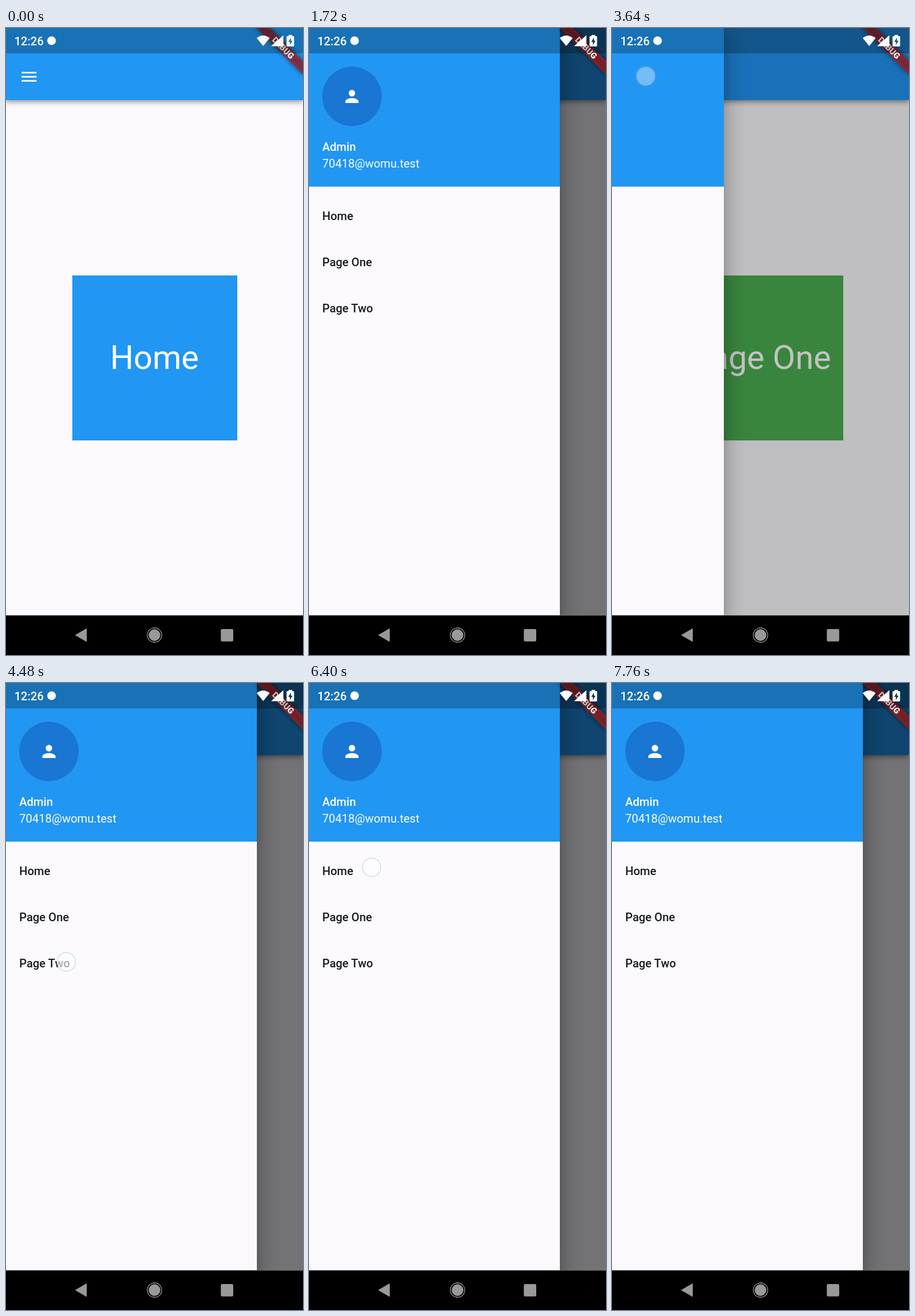
An HTML page that plays this animation: 515 px wide and 1087 px high, repeating every 8000 ms.

```html
<!DOCTYPE html>
<html lang="en">
<head>
<meta charset="utf-8">
<title>Navigation drawer</title>
<style>
  html, body { margin: 0; width: 100%; height: 100%; overflow: hidden; background: #000; }
  body, #app { font: 20px Roboto, sans-serif; }
  #app { position: relative; width: 515px; height: 1087px; overflow: hidden; background: #fbf9fd; }
  #app div, svg { position: absolute; }
  svg { left: 0; top: 0; }
  .blue { background: #2196f3; }
  .bar { width: 515px; height: 124.5px;
    box-shadow: 0 3px 6px -1px #0003, 0 6px 7px #00000024, 0 1px 12px #0000001f; }
  #card { left: 114.5px; top: 428.5px; width: 286px; height: 286px;
    font-size: 57.2px; line-height: 286px; text-align: center; white-space: nowrap; color: #fff; }
  #scrim { width: 515px; height: 1018px; background: #000; }
  #drawer { width: 435px; height: 1018px; background: #fbf9fd;
    box-shadow: 0 8px 15px -4px #0003, 0 18px 32px 3px #00000024, 0 8px 36px 6px #0000001f; }
  .header { width: 435px; height: 274.5px; }
  #touch { width: 31px; height: 31px; margin: -17px; border: 1.5px solid #8eaed899;
    border-radius: 50%; background: #ffffffa0; box-shadow: 0 0 4px #ffffff50; }
</style>
</head>
<body>
<div id="app">
  <div id="card"></div>
  <div class="bar blue"></div>
  <svg width="515" height="125" fill="#fff">
    <path d="M27.1 75.9h25.8v2.9H27.1zM27.1 83h25.8v2.9H27.1zM27.1 90.2h25.8v2.9H27.1z"/>
  </svg>
  <div id="scrim"></div>

  <div id="drawer">
    <div class="header blue"></div>
    <svg width="435" height="1018" fill="#fff">
      <circle cx="74.5" cy="118.5" r="51.5" fill="#1976d2"/>
      <path transform="translate(57.3 101.5) scale(1.4306)"
        d="M12 12a4 4 0 1 0 0-8 4 4 0 0 0 0 8zm0 2c-2.67 0-8 1.34-8 4v2h16v-2c0-2.66-5.33-4-8-4z"/>
      <text x="23" y="213" font-weight="500">Admin</text>
      <text x="23" y="242">70418@womu.test</text>
      <g fill="#1a1b20" font-weight="500">
        <text x="23" y="333">Home</text>
        <text x="23" y="413">Page One</text>
        <text x="23" y="493">Page Two</text>
      </g>
    </svg>
  </div>

  <svg width="515" height="1087" fill="#fff">
    <defs>
      <filter id="soft" x="-20%" y="-100%" width="140%" height="300%">
        <feGaussianBlur stdDeviation="3"/>
      </filter>
    </defs>
    <!-- corner banner -->
    <g transform="translate(515) rotate(45) scale(1.4306)">
      <rect x="-40" y="28" width="80" height="12" fill="#0000007f" filter="url(#soft)"/>
      <rect x="-40" y="28" width="80" height="12" fill="#b71c1ca0"/>
      <text y="37.6" font-size="10.2" font-weight="900" text-anchor="middle">DEBUG</text>
    </g>
    <!-- status bar -->
    <rect width="515" height="44" fill="#00000040"/>
    <text x="14.5" y="30" font-weight="500">12:26</text>
    <circle cx="79" cy="22" r="7.5"/>
    <path d="M434.8 17.5Q446 8.5 457.2 17.5L446 31.2zM481 12.5V31.5H459.5z"/>
    <path fill-rule="evenodd" d="M490 12h6v2h2q1.5 0 1.5 1.5v15q0 1.5-1.5 1.5h-10q-1.500 0-1.500-1.500v-15q0-1.500 1.500-1.500h2z
      M494 16.500l-4.500 7.500h2.800v5.500l4.500-7.500h-2.800z"/>
    <!-- system navigation -->
    <rect y="1018.300" width="515" height="69"/>
    <rect y="1018.300" width="515" height="69" fill="#000"/>
    <g fill="#999" stroke="#999" stroke-linejoin="round">
      <path d="M120.500 1052.500L139.500 1041.500V1063.500z"/>
      <circle cx="257.500" cy="1052.500" r="9.700"/>
      <circle cx="257.500" cy="1052.500" r="12.500" fill="none" stroke-width="1.300"/>
      <rect x="373" y="1042.500" width="20.500" height="20.500" rx="1.500"/>
    </g>
  </svg>
  <div id="touch"></div>
</div>

<script>
const LOOP = 8000, STEP = 40, WIDTH = 435;
const $ = id => document.getElementById(id);
const card = $('card'), scrim = $('scrim'), drawer = $('drawer'), touch = $('touch');

const home = ['Home', '#2196f3'];
const one = ['Page One', '#4caf50'];
const two = ['Page Two', '#ffeb3b'];

// A tap with a page closes the drawer; one without opens it.
const taps = [
  { down: 1320, move: 1410, x: 60, y: 88 },
  { down: 2600, move: 2690, x: 105, y: 403, page: one },
  { down: 3520, move: 3575, x: 58.5, y: 83.5 },
  { down: 4360, move: 4530, x: 105, y: 484, page: two },
  { down: 5480, move: 5570, x: 62, y: 88 },
  { down: 6400, move: 6530, x: 109, y: 319.5, page: home },
  { down: 7360, move: 7450, x: 80.5, y: 95 }
];

const clamp = v => Math.min(1, Math.max(0, v));

// Critically damped spring, slightly overshooting its target of 1.
function spring(ms) {
  if (ms <= 0) return 0;
  const s = ms / 1000, w = Math.sqrt(500);
  return clamp(1.01 - (1.01 + (1.01 * w - 1) * s) * Math.exp(-w * s));
}

function draw(t) {
  let page = home, open = 0, dot = 0;
  for (const tap of taps) {
    if (t < tap.down) break;
    dot = clamp(1 - (t - tap.move + 15) / 200);
    touch.style.left = tap.x + 'px';
    touch.style.top = tap.y + 'px';
    if (t < tap.move) break;
    const s = spring(t - tap.move);
    open = tap.page ? 1 - s : s;
    page = tap.page || page;
  }
  card.textContent = page[0];
  card.style.background = page[1];
  scrim.style.opacity = 0.54 * open;
  drawer.style.visibility = open ? 'visible' : 'hidden';
  drawer.style.transform = `translateX(${(open - 1) * WIDTH}px)`;
  touch.style.opacity = dot;
}

const start = performance.now();
function tick(now) {
  const t = Math.max(0, now - start) % LOOP;
  draw(Math.floor((t + 1) / STEP) * STEP);
  requestAnimationFrame(tick);
}
draw(0);
requestAnimationFrame(tick);
</script>
</body>
</html>
```
